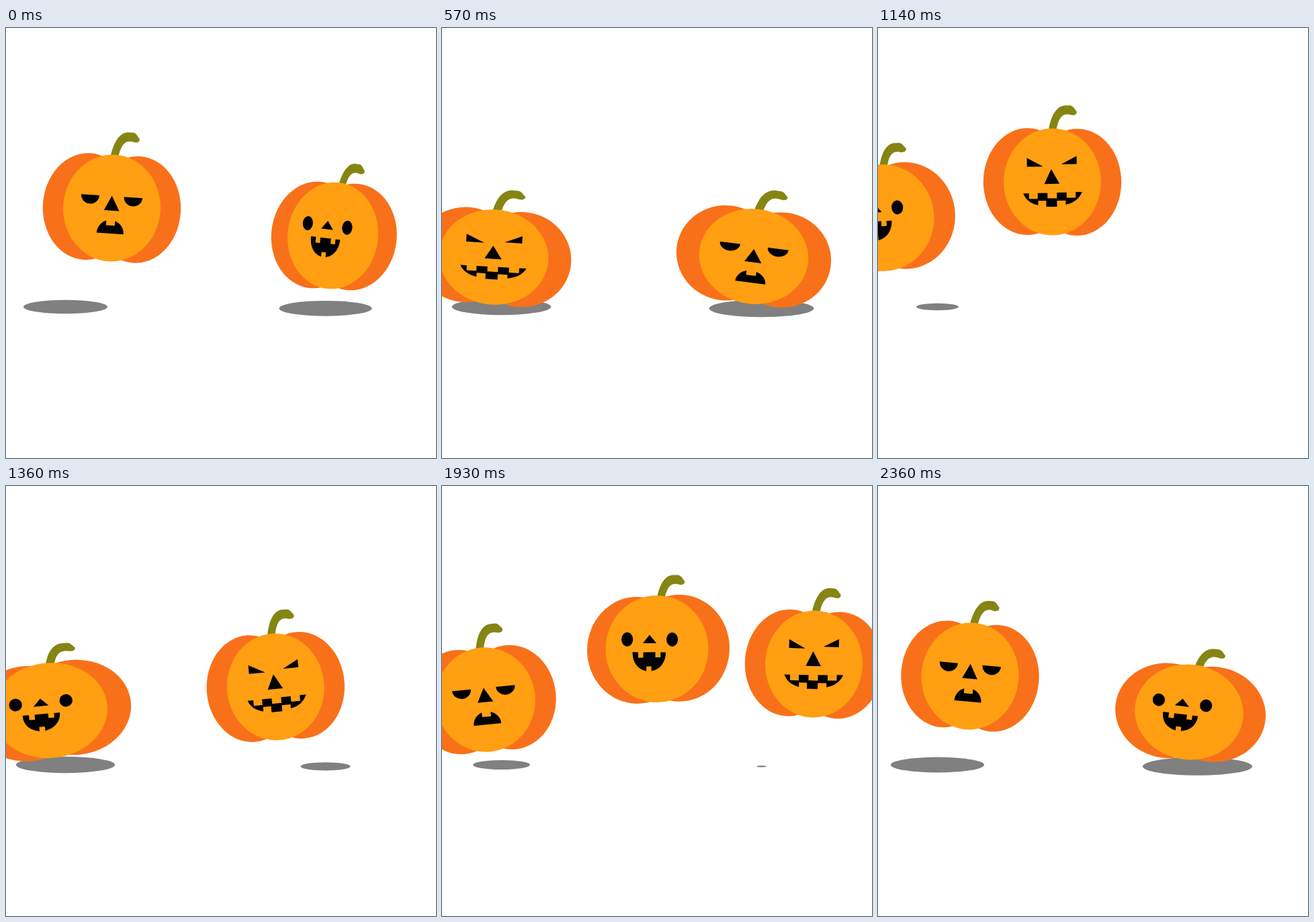
An HTML page that plays this animation: 640 px wide and 640 px high, repeating every 2430 ms.

```html
<!DOCTYPE html>
<html lang="en">
<head>
<meta charset="utf-8">
<title>Bouncing pumpkins</title>
<style>
html, body { margin: 0; width: 100%; height: 100%; overflow: hidden; background: #fff; }
svg { display: block; width: 100%; height: 100%; }
.side { fill: #f8711a; }
.front { fill: #ff9f11; }
.stem { fill: #858514; }
.shade { fill: #808080; }
</style>
</head>
<body>
<svg viewBox="0 0 640 640">
  <ellipse class="shade" id="shadeL" cx="88.5" cy="415"/>
  <ellipse class="shade" id="shadeR" cx="475.5" cy="417.3"/>
  <g id="patch"></g>
</svg>
<script>
const LOOP = 2430, STEPS = 34;
const LAND = 72, HOP = 383;   // first landing spot and hop length

const faces = {
  grumpy: `
    <path id="wink" d="M-46.8-17.7h27.2a13.6 13.2 0 0 1-27.2 0z"/>
    <path d="M17-17.7h27.6a13.8 13.2 0 0 1-27.6 0z"/>
    <g id="pout">
      <path d="M-1-18.2L11.2 3.7H-11.5z"/>
      <path d="M-20.2 38A20 20 0 0 1-7 19V26H6V19A20 20 0 0 1 19.8 38z"/>
    </g>`,
  happy: `
    <g transform="rotate(-.5)">
      <ellipse cx="-44.3" cy="-14.4" rx="8.6" ry="10.5"/>
      <ellipse cx="22.7" cy="-14" rx="8.6" ry="10.5"/>
      <path d="M-11-21L-.8-8.5H-21z"/>
      <path d="M-36.5 4.5H-28V13H-20.5V4.8H-2.5V12.5H5.2V5H13
        C13 20 4 31-8.5 33V26H-16V33C-29 30-36.5 20-36.5 4.5z"/>
    </g>`,
  evil: `
    <g transform="rotate(-1.5)">
      <path d="M-37.5-36V-23H-13.5z"/>
      <path d="M36.5-38V-26H13.5z"/>
      <path d="M-1.5-19L10.6 3H-12z"/>
      <path d="M-43.5 16.7H-35V25H-22V16.5H-7.5V24.5H6.5V16H21V24H34.5V15.5H44
        C40 25 32 32 19.5 34V28H6.5V37H-9.5V28H-21.5V34.5C-33 32-40 26-43.5 16.7z"/>
    </g>`
};

const slim = { rx: 72.4, side: 65.7, left: [-37, 0], right: [37, 0], stem: [0, 0] };
const wide = { rx: 76.5, side: 74.5, left: [-29.5, 2], right: [33.5, -1.4], stem: [6, 4] };

// key points of each bouncing path: step, x, y
const pumpkins = [
  { face: 'grumpy', body: slim, exitWidth: 1,
    path: [[24, -100, 232], [27, 64.5, 318], [30, 90, 335], [33, 137, 283], [34, 157.5, 268],
      [38, 377.5, 245], [42, 464, 340], [46, 500, 277], [50, 750, 232]] },
  { face: 'happy', body: wide, exitWidth: .88,
    path: [[13, -155, 225], [16, 7, 282.5], [20, 78, 342], [23, 108, 305], [27, 320, 242.5],
      [31, 452, 340], [33, 463, 336.5], [34, 486.5, 309], [38, 700, 223], [40, 805, 235]] },
  { face: 'evil', body: slim, exitWidth: 1,
    path: [[2, -160, 218], [4, -58, 234], [8, 77, 341], [12, 105.3, 312], [16, 259.5, 229],
      [20, 438, 322], [23, 466.5, 336.5], [27, 553.5, 265], [31, 770, 232]] }
];

// each shadow swells as a parabola around a landing: middle step, half length
const shadows = [
  { id: 'shadeL', width: 147.7, pulses: [[8.2, 4.2], [19.25, 4.29], [31.37, 6.7]] },
  { id: 'shadeR', width: 165, pulses: [[9, 4.26], [22.5, 4.72], [32.63, 3.39]] }
];

const $ = id => document.getElementById(id);
const clamp = (v, lo = 0, hi = 1) => Math.min(hi, Math.max(lo, v));

// smooth curve through the key points
function curve(keys, k, c) {
  let i = 0;
  while (i < keys.length - 2 && k >= keys[i + 1][0]) i++;
  const a = keys[i], b = keys[i + 1], d = b[0] - a[0];
  const u = (k - a[0]) / d, v = 1 - u;
  const slope = j => {
    const p = keys[Math.max(0, j - 1)], q = keys[Math.min(keys.length - 1, j + 1)];
    return (q[c] - p[c]) / (q[0] - p[0]) * d;
  };
  return a[c] * (1 + 2 * u) * v * v + slope(i) * u * v * v
    + b[c] * u * u * (3 - 2 * u) - slope(i + 1) * u * u * v;
}

// leans forward on take-off, back before landing
function tiltAt(x) {
  const hop = (x - LAND) / HOP, g = hop - Math.round(hop);
  return .8 + 6.5 * Math.cos(Math.PI * g) ** 3 * clamp(g / .02, -1, 1);
}

function build({ face, body }) {
  const lobe = ([x, y]) => `<ellipse class="side" cx="${x}" cy="${y}" rx="${body.side}" ry="79.5"/>`;
  const g = document.createElementNS('http://www.w3.org/2000/svg', 'g');
  g.innerHTML = lobe(body.left) + lobe(body.right) +
    `<path class="stem" transform="translate(${body.stem})" d="M-7-75C-4-98 5-114 18-114H25
      C30-113 31-109 34.5-105.5C36-99 28-99 24-100.5C12-103 7-92 4.5-75z"/>
    <ellipse class="front" rx="${body.rx}" ry="79.5"/>` + faces[face];
  $('patch').append(g);
  return g;
}

function drawPumpkin(p, step) {
  const first = p.path[0][0], last = p.path[p.path.length - 1][0];
  const k = step + STEPS <= last ? step + STEPS : step;
  const on = k >= first && k <= last;
  p.node.style.display = on ? '' : 'none';
  if (!on) return;

  const x = curve(p.path, k, 1), y = curve(p.path, k, 2);
  const squash = clamp((y - 314) / 20);
  const wink = p.face === 'grumpy' ? clamp(1 - Math.abs(k - 38) / 2) : 0;
  const width = 1 + (p.exitWidth - 1) * clamp((x - 440) / 46);
  const sx = width * (1 + .125 * squash + .08 * wink);
  const sy = 1 - .11 * squash - .044 * wink;
  p.node.setAttribute('transform',
    `translate(${x} ${y}) rotate(${tiltAt(x)}) scale(${sx} ${sy})`);

  if (p.face === 'grumpy') {
    $('wink').setAttribute('transform', `translate(-33 -2) scale(${1 - .53 * wink}) translate(33 2)`);
    $('pout').setAttribute('transform', `translate(0 ${6 * clamp((k - 35) / 3)})`);
  }
}

function drawShadow({ id, width, pulses }, step) {
  const size = Math.max(0, ...pulses.map(([mid, half]) => {
    const d = (step - mid + STEPS * 1.5) % STEPS - STEPS / 2;
    return 1 - (d / half) ** 2;
  }));
  $(id).setAttribute('rx', width * size / 2);
  $(id).setAttribute('ry', width * size * .0825);
}

function draw(step) {
  pumpkins.forEach(p => drawPumpkin(p, step));
  shadows.forEach(s => drawShadow(s, step));
}

for (const p of pumpkins) p.node = build(p);
const start = performance.now();

function tick(now) {
  const t = Math.max(0, now - start) % LOOP;
  draw(Math.min(STEPS - 1, Math.floor((t + 7) * STEPS / LOOP)));
  requestAnimationFrame(tick);
}
draw(0);
requestAnimationFrame(tick);
</script>
</body>
</html>
```
